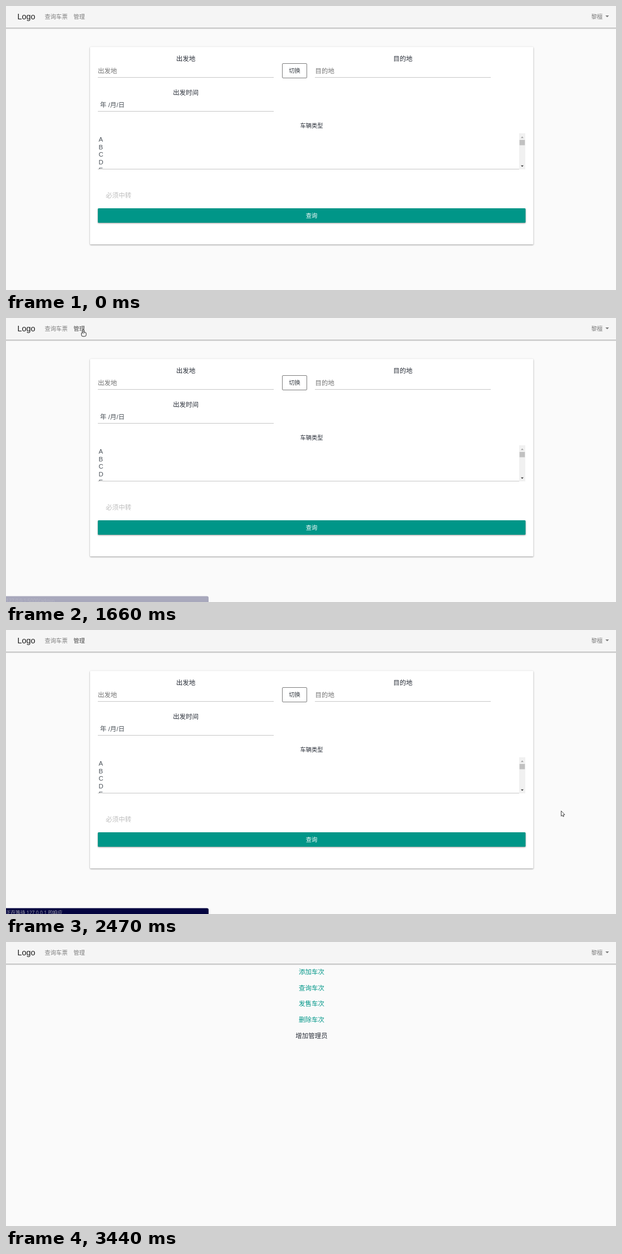
Write an HTML page with a canvas that moves like this. It is 1096 px wide and 511 px high and loops after 3.6 s.

```html
<!DOCTYPE html>
<html lang="zh-CN">
<head>
<meta charset="utf-8">
<title>查询车票</title>
<style>
  html, body { margin: 0; width: 100%; height: 100%; overflow: hidden; background: #fafafa; }
  canvas { display: block; }
</style>
</head>
<body>
<canvas id="stage" width="1096" height="511"></canvas>
<script>
const ctx = document.getElementById('stage').getContext('2d');
const LOOP = 3600, TICK = 10;
const HOVER = 1500, LEAVE = 1760, WAIT = 2050, LOADED = 3040, DONE = 3440;
const UI = '"Liberation Sans", "Noto Sans CJK SC", "Noto Sans CJK", Arial, sans-serif';
const STATUS = '"Open Sans", "Noto Sans CJK SC", "Noto Sans CJK", sans-serif';
const SMALL = 10.3, BODY = 11.52;
const TEAL = '#009688', INK = '#2b303a', GRAY = '#7f7f7f', RULE = '#c6c6c6';

// pointer enters at START, then glides to each stop
const START = { x: 975, y: 494 };
const MOVES = [
  { from: 180, to: 670, x: 320, y: 109 },
  { from: 800, to: 940, x: 180, y: 27 },
  { from: 1060, to: 1240, x: 147, y: 27 },
  { from: 1460, to: 1540, x: 139, y: 20 },
  { from: 1740, to: 1920, x: 469, y: 234 },
  { from: 2050, to: 2150, x: 518, y: 278 },
  { from: 2170, to: 2470, x: 997, y: 325 },
  { from: 2600, to: 2760, x: 1063, y: 442 },
  { from: 2940, to: 3140, x: 1084, y: 497 },
  { from: 3180, to: 3240, x: 1085, y: 512 }
];

const clamp = v => Math.max(0, Math.min(1, v));
const ease = k => k * k * (3 - 2 * k);

function pointerAt(t) {
  let { x, y } = START;
  for (const m of MOVES) {
    const k = ease(clamp((t - m.from) / (m.to - m.from)));
    x += (m.x - x) * k;
    y += (m.y - y) * k;
  }
  return { x: Math.round(x), y: Math.round(y) };
}

function rect(x, y, w, h, color) {
  ctx.fillStyle = color;
  ctx.fillRect(x, y, w, h);
}

function roundBox(x, y, w, h, r, fill, stroke) {
  ctx.beginPath();
  ctx.roundRect(x, y, w, h, r);
  paint(fill, stroke);
}

function paint(fill, stroke) {
  if (fill) {
    ctx.fillStyle = fill;
    ctx.fill();
  }
  if (stroke) {
    ctx.strokeStyle = stroke;
    ctx.lineWidth = 1;
    ctx.stroke();
  }
}

// y is the visual middle of the line
function text(str, x, y, size, color, align = 'left', font = UI) {
  ctx.font = size + 'px ' + font;
  ctx.textAlign = align;
  ctx.fillStyle = color;
  ctx.fillText(str, x, y + size * 0.37);
}

function polygon(points, fill, stroke) {
  ctx.beginPath();
  points.forEach(([x, y]) => ctx.lineTo(x, y));
  ctx.closePath();
  paint(fill, stroke);
}

// small triangle; a negative height points up
function caret(x, y, half, height, color) {
  polygon([[x - half, y], [x + half, y], [x, y + height]], color);
}

function raised(x, y, w, h, color) {
  ctx.save();
  ctx.shadowColor = 'rgba(0,0,0,.4)';
  ctx.shadowOffsetY = 1;
  ctx.shadowBlur = 2.5;
  roundBox(x, y, w, h, 1.5, color);
  ctx.restore();
}

function navbar(active) {
  raised(-10, -10, 1116, 49, '#f5f5f5');
  rect(0, 39, 1096, 1, '#b4b4b4');
  text('Logo', 20.5, 18.5, 14.4, '#1a1a1a');
  text('查询车票', 69.5, 19, SMALL, GRAY);
  text('管理', 121.3, 19, SMALL, active ? '#4a4a4a' : GRAY);
  text('黎檀', 1051.5, 19, SMALL, GRAY);
  caret(1080.2, 17, 3.2, 3.2, '#777');
}

function field(label, hint, x, y, shade, inset = 0) {
  text(label, x + 158, y - 33.5, BODY, INK, 'center');
  text(hint, x + inset, y - 11, BODY, shade);
  rect(x, y, 316, 1, RULE);
}

function typeList() {
  text('车辆类型', 549, 215.5, SMALL, INK, 'center');
  ctx.save();
  ctx.beginPath();
  ctx.rect(165, 229, 757, 65);
  ctx.clip();
  [...'ABCDE'].forEach((c, i) => text(c, 166.5, 239.6 + i * 13.8, BODY, '#495057'));
  ctx.restore();
  rect(165, 293, 768, 1, RULE);
  rect(922, 229, 11, 65, '#f1f1f1');
  rect(922.7, 241, 9.6, 9.5, '#c1c1c1');
  caret(927.5, 237.5, 2.5, -2.7, '#a0a0a0');
  caret(927.5, 286.8, 2.5, 2.7, '#404040');
}

function searchPage() {
  raised(151, 73.5, 796.5, 355.5, '#fff');
  field('出发地', '出发地', 165, 128, '#757575');
  field('目的地', '目的地', 555, 128, '#757575', 0.5);
  field('出发时间', '年 /月/日', 165, 189, '#495057', 4);
  // cover the seam between the label rows
  roundBox(496.5, 103.5, 44, 26, 1.5, null, '#7c7c7c');
  text('切换', 518.5, 116, SMALL, '#343a40', 'center');
  typeList();
  text('必须中转', 179.3, 341, BODY, '#bdbdbd');
  raised(165, 364, 768.5, 26, TEAL);
  text('查询', 549, 377, SMALL, '#fff', 'center');
}

function adminPage() {
  ['添加车次', '查询车次', '发售车次', '删除车次', '增加管理员'].forEach((s, i) =>
    text(s, 549, 53.8 + i * 28.7, BODY, i < 4 ? TEAL : INK, 'center'));
}

function statusBar(t) {
  const alpha = Math.min(clamp((t - 1620) / 120), clamp((DONE - t) / 200));
  if (!alpha) return;
  const waiting = t >= WAIT;
  ctx.save();
  ctx.globalAlpha = alpha;
  roundBox(-4, 500.5, 368, 20, 3, '#040440');
  text(waiting ? '正在等待 127.0.0.1 的响应...' : '127.0.0.1:5000/admin',
    0, 508.6, 8.64, waiting ? '#a8a8b0' : '#d4d4dc', 'left', STATUS);
  ctx.restore();
}

function arrow() {
  polygon([[0.5, 0.5], [0.5, 10], [2.6, 8.1], [4, 11], [5.3, 10.4], [4.2, 7.5], [7, 7.3]],
    '#fff', '#444');
}

function hand() {
  roundBox(-3.5, 5.5, 8.5, 7.5, 2.5, '#fff', '#222');
  roundBox(-1, 0.5, 2.2, 8, 1, '#fff', '#222');
  rect(-0.4, 6, 1.2, 4, '#fff');
}

function pointer(t) {
  const { x, y } = pointerAt(t);
  if (t < MOVES[0].from || y > 511) return;
  ctx.save();
  ctx.translate(x, y);
  t >= HOVER && t < LEAVE ? hand() : arrow();
  ctx.restore();
}

function draw() {
  const t = Math.floor(performance.now() % LOOP / TICK) * TICK;
  const admin = t >= LOADED;
  rect(0, 0, 1096, 511, '#fafafa');
  admin ? adminPage() : searchPage();
  navbar(t >= HOVER && !admin);
  statusBar(t);
  pointer(t);
  requestAnimationFrame(draw);
}
draw();
</script>
</body>
</html>
```
